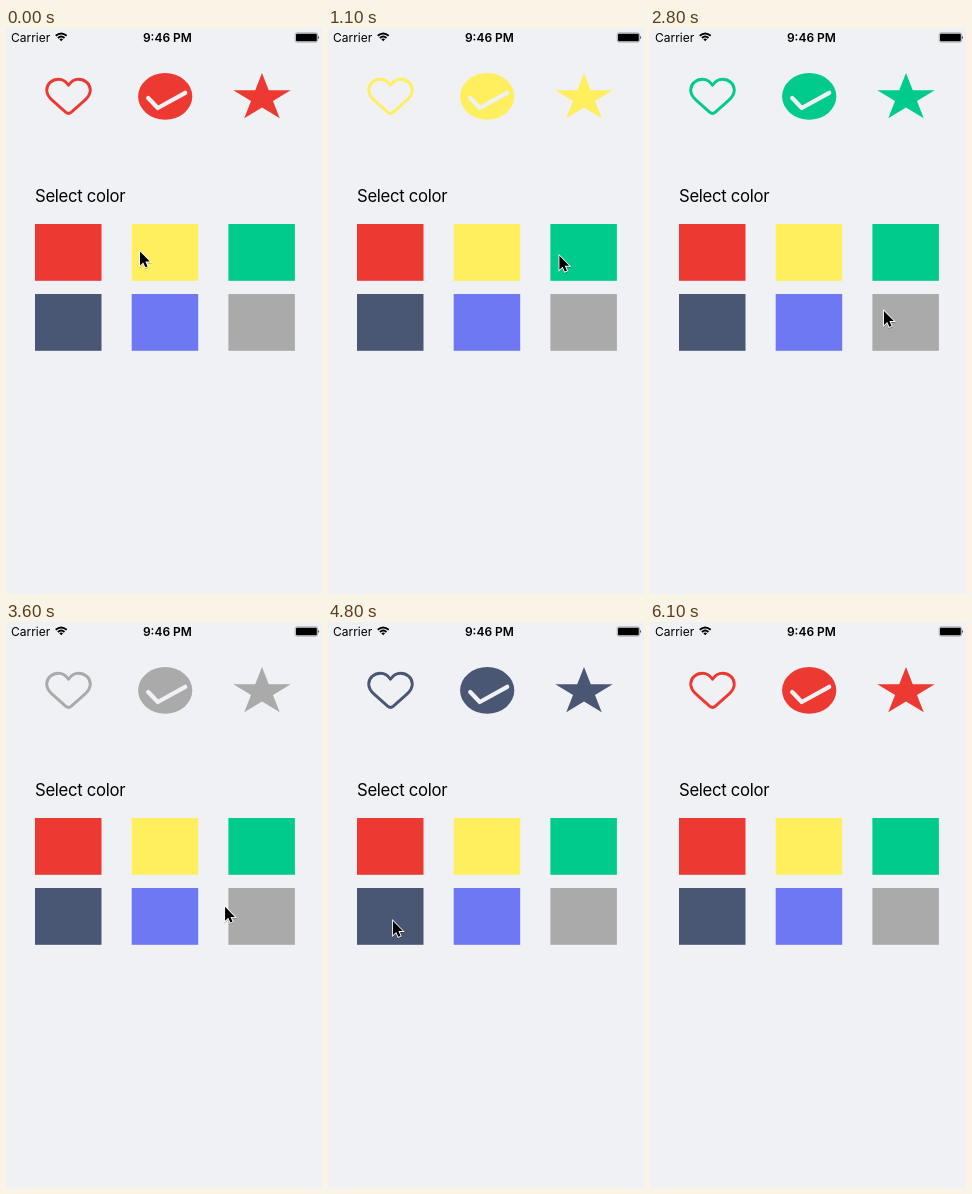
Write an HTML page that moves like this. It is 316x566 px and loops after 6800 ms.

```html
<!DOCTYPE html>
<html lang="en">
<head>
<meta charset="utf-8">
<title>Select color</title>
<style>
  html, body { margin: 0; width: 100%; height: 100%; overflow: hidden; background: #eff1f5; }
  svg { display: block; width: 100%; height: 100%; }
  text { font-family: Inter, Roboto, "Liberation Sans", sans-serif; fill: #000; }
</style>
</head>
<body>
<svg viewBox="0 0 316 566">
  <defs>
    <filter id="shadow" x="-50%" y="-30%" width="220%" height="180%">
      <feDropShadow dx="0" dy="1" stdDeviation="0.8" flood-opacity="0.35"/>
    </filter>
  </defs>
  <rect width="316" height="566" fill="#eff1f5"/>

  <text x="5" y="13.5" font-size="12">Carrier</text>
  <g fill="none" stroke="#000" stroke-width="1.9">
    <path d="M49.7 7.8Q55.2 3.2 60.7 7.8"/>
    <path d="M51.9 10Q55.2 7.2 58.5 10"/>
  </g>
  <path d="M53.3 11.3Q55.2 9.9 57.1 11.3L55.2 13.2Z"/>
  <text x="161.4" y="13.5" font-size="12" font-weight="600" text-anchor="middle">9:46 PM</text>
  <rect x="289.2" y="4.9" width="22.4" height="9.2" rx="1.8" fill="none" stroke="#777" stroke-width="0.6"/>
  <rect x="290" y="5.7" width="20.8" height="7.6" rx="1"/>
  <path d="M312.3 7.8Q314 9.5 312.3 11.2Z"/>

  <g id="icons">
    <path d="M62.5 57.2C59.8 53.2 56.6 51.3 52.6 51.3C46 51.3 40.7 56 40.7 62C40.7 66.4 43 69.4 46.4 72.4L59.6 84.2Q62.5 86.6 65.4 84.2L78.6 72.4C82 69.4 84.3 66.4 84.3 62C84.3 56 79 51.3 72.4 51.3C68.4 51.3 65.2 53.2 62.5 57.2Z"
      fill="none" stroke="currentColor" stroke-width="2.9" stroke-linejoin="round"/>
    <ellipse cx="159.2" cy="68.4" rx="27.1" ry="23.3" fill="currentColor"/>
    <path d="M142.2 70L151.8 80L179.2 64.8" fill="none" stroke="#eff1f5" stroke-width="4.2" stroke-linecap="round" stroke-linejoin="round"/>
    <polygon id="star" fill="currentColor"/>
  </g>

  <text x="29" y="173.5" font-size="16.7" letter-spacing="-0.3">Select color</text>
  <g id="swatches"></g>
  <g id="cursor">
    <path d="M0 0V15.2L3.5 11.9L5.8 17.2L8.2 16.2L5.9 11H10.7Z" transform="scale(0.92)"
      stroke="#fff" stroke-width="1.8" paint-order="stroke" filter="url(#shadow)"/>
  </g>
</svg>
<script>
  const LOOP = 6800, STEP = 100, HIDE_AT = 6100;
  const red = '#ec3a33', yellow = '#ffef5e', green = '#00cb8c';
  const navy = '#495774', purple = '#6d78f2', gray = '#aaaaaa';
  const byId = id => document.getElementById(id);

  // Time at which each colour is tapped
  const taps = [[0, red], [400, yellow], [1900, green], [3000, gray],
    [4000, purple], [4800, navy], [5900, red]];

  // Pointer glides: start time, end time, and where the tip comes to rest
  const home = [134, 223.5];
  const glides = [
    { from: 0, to: 200, end: [143.5, 226] },
    { from: 700, to: 1300, end: [245, 228] },
    { from: 1400, to: 1700, end: [255.5, 228.5] },
    { from: 2200, to: 2400, end: [247, 237] },
    { from: 2500, to: 2800, end: [234, 283] },
    { from: 2900, to: 3100, end: [247, 284] },
    { from: 3500, to: 3900, end: [174, 286] },
    { from: 4000, to: 4600, end: [86, 293] },
    { from: 4600, to: 4800, end: [65, 299] },
    { from: 4900, to: 5400, end: [81, 225.5] }
  ];

  const easeOut = k => Math.sin(k * Math.PI / 2);
  const clamp = k => Math.min(1, Math.max(0, k));

  const rect = (color, i) =>
    `<rect x="${29 + (i % 3) * 96.7}" y="${i < 3 ? 196 : 266}" width="66.5" height="56.8" fill="${color}"/>`;
  byId('swatches').innerHTML = [red, yellow, green, navy, purple, gray].map(rect).join('');

  const starPoint = (_, i) => {
    const r = i % 2 ? 0.382 : 1, a = i * Math.PI / 5;
    return `${256 + 30.2 * r * Math.sin(a)},${70 - 25 * r * Math.cos(a)}`;
  };
  byId('star').setAttribute('points', Array.from({ length: 10 }, starPoint).join(' '));

  const tipAt = t => glides.reduce((tip, { from, to, end }) => {
    const k = easeOut(clamp((t - from) / (to - from)));
    return tip.map((v, axis) => v + (end[axis] - v) * k);
  }, home);

  function draw(now) {
    const t = Math.floor(now % LOOP / STEP) * STEP;
    const color = taps.filter(([time]) => time <= t).pop()[1];
    byId('icons').setAttribute('color', color);
    byId('cursor').setAttribute('transform', `translate(${tipAt(t)})`);
    byId('cursor').setAttribute('visibility', t < HIDE_AT ? 'visible' : 'hidden');
  }

  const start = performance.now();
  function tick() {
    draw(performance.now() - start);
    requestAnimationFrame(tick);
  }
  tick();
</script>
</body>
</html>
```
